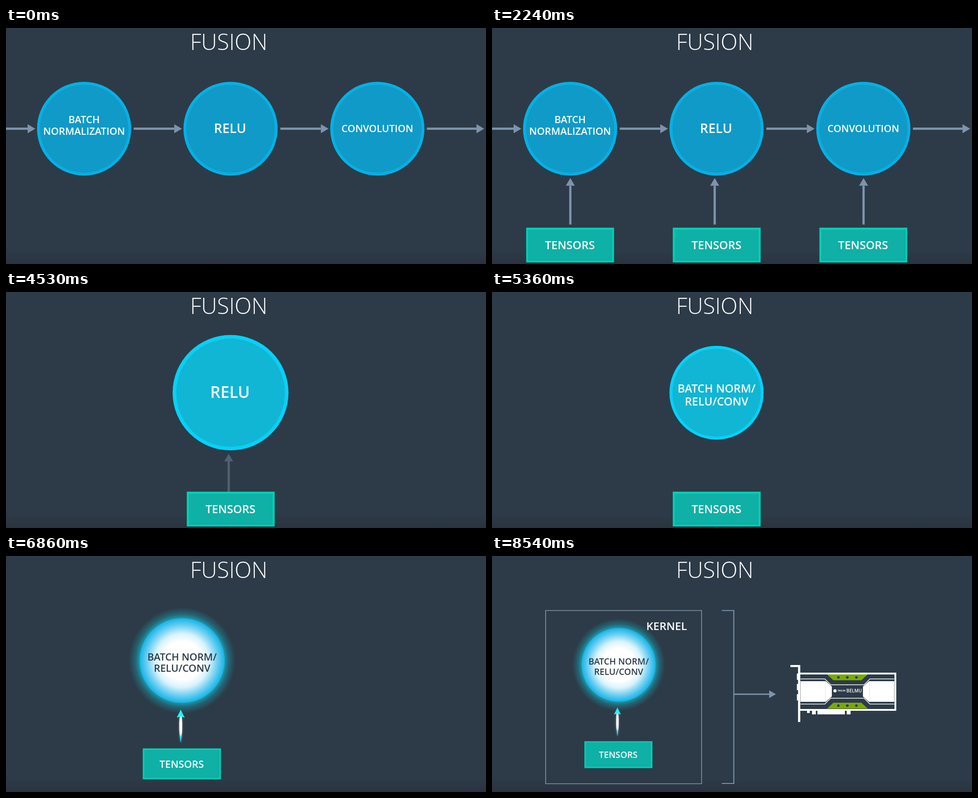
Recreate the animation shown at these times as an HTML page with a canvas. Size 1065 px wide and 526 px high, loop 8.97 s.

```html
<!DOCTYPE html>
<html lang="en">
<head>
<meta charset="utf-8">
<title>Fusion</title>
<style>
html, body { margin: 0; width: 100%; height: 100%; overflow: hidden; background: #2d3b48; }
canvas { display: block; }
</style>
</head>
<body>
<canvas id="stage" width="1065" height="526"></canvas>
<script>
const ctx = document.getElementById('stage').getContext('2d');
const LOOP = 8970, BEAT = 209.6, LEAD = 82;
const DARK = '#2d3b48', STEEL = '#7d94ac', WHITE = '#fff';
const MID = 224.4, RADIUS = 104.5, ARROW_TRAVEL = 45, BOX_TRAVEL = 55;
const columnX = i => 173.3 + 325.3 * i;
const COLUMNS = [
  { lines: ['BATCH', 'NORMALIZATION'], size: 22, boxExit: 3070, arrowExit: 3220 },
  { lines: ['RELU'], size: 29, boxExit: Infinity, arrowExit: 4150 },
  { lines: ['CONVOLUTION'], size: 21.8, boxExit: 3245, arrowExit: 3490 }
];
let now = 0;

const ramp = (start, length) => Math.min(1, Math.max(0, (now - start) / length));
const smooth = p => p * p * (3 - 2 * p);
const easeOut = p => 1 - (1 - p) ** 2;
const lerp = (a, b, p) => a + (b - a) * p;
// The picture moves in even held beats.
const hold = time => Math.floor((time + LEAD) / BEAT) * BEAT - LEAD;

function layer(alpha, x, y, scale, draw) {
  if (alpha <= 0 || scale === 0) return;
  ctx.save();
  ctx.globalAlpha *= alpha;
  ctx.translate(x, y);
  ctx.scale(scale, scale);
  draw();
  ctx.restore();
}

// Rises into view at `enter`, drops out of view at `exit`.
function drift(enter, exit, travel, draw) {
  const shown = easeOut(ramp(enter, 500)), gone = ramp(exit, 500) ** 2;
  layer(shown * (1 - gone), 0, travel * (1 - shown + gone), 1, draw);
}

function text(str, x, y, size, color = WHITE, weight = 600) {
  ctx.font = `${weight} ${size}px "Open Sans", sans-serif`;
  ctx.textAlign = 'center';
  ctx.fillStyle = color;
  ctx.fillText(str, x, y);
}

function box(x, y, w, h, color) {
  ctx.fillStyle = color;
  ctx.fillRect(x, y, w, h);
}

function disc(x, y, r, fill) {
  ctx.fillStyle = fill;
  ctx.beginPath();
  ctx.arc(x, y, r, 0, 7);
  ctx.fill();
}

function path(points) {
  ctx.beginPath();
  points.forEach(p => ctx.lineTo(...p));
}

function poly(points, color) {
  path(points);
  ctx.fillStyle = color;
  ctx.fill();
}

function trace(points, amount, color, width) {
  if (!amount) return;
  const total = points.slice(1).reduce((sum, p, i) =>
    sum + Math.hypot(p[0] - points[i][0], p[1] - points[i][1]), 0);
  ctx.save();
  ctx.setLineDash([total * amount, total * 2]);
  ctx.strokeStyle = color;
  ctx.lineWidth = width;
  path(points);
  ctx.stroke();
  ctx.restore();
}

function spread(gradient, colors) {
  colors.forEach((c, i) => gradient.addColorStop(i / (colors.length - 1), c));
  return gradient;
}

const radial = (inner, outer, ...colors) =>
  spread(ctx.createRadialGradient(0, 0, inner, 0, 0, outer), colors);
const vertical = (top, bottom, ...colors) =>
  spread(ctx.createLinearGradient(0, top, 0, bottom), colors);

function arrow(x, y, length, angle = 0, thick = 5, head = 17, half = 10) {
  ctx.save();
  ctx.translate(x, y);
  ctx.rotate(angle);
  box(0, -thick / 2, length - head, thick, STEEL);
  poly([[length - head, -half], [length, 0], [length - head, half]], STEEL);
  ctx.restore();
}

function tensors(x, y) {
  box(x - 92.5, y + 5, 185, 67.5, '#0fb0a5');
  ctx.strokeStyle = '#00ceb5';
  ctx.lineWidth = 5;
  ctx.strokeRect(x - 95, y + 2.5, 190, 72.5);
  text('TENSORS', x - 0.5, y + 48, 25);
}

function node(x, scale, light, label) {
  layer(1, x, MID, scale, () => {
    disc(0, 0, RADIUS, `rgb(6,${lerp(176, 209, light)},${lerp(228, 247, light)})`);
    disc(0, 0, RADIUS - 6.5, `rgb(16,${lerp(154, 182, light)},${lerp(199, 212, light)})`);
    label();
  });
}

function columnLabel({ lines, size }) {
  const first = lines.length > 1 ? -12.5 : size * 0.33;
  lines.forEach((line, i) => text(line, 0, first + 26 * i, size));
}

function fusedLabel(color) {
  text('BATCH NORM/', 0, -0.5, 24.9, color);
  text('RELU/CONV', 0, 28.5, 24.9, color);
}

function pipeline() {
  for (let i = 0; i < 4; i++) {
    const last = i === 3;
    drift(-1000, last ? 3070 : 3180, ARROW_TRAVEL, () =>
      arrow(columnX(i - 1) + 110, MID, last ? 127 : 107));
  }
  COLUMNS.forEach(({ boxExit, arrowExit }, i) => {
    const x = columnX(i), arrowX = i === 1 ? x - 4.5 : x + 0.5;
    drift(1450 + 130 * i, arrowExit, ARROW_TRAVEL, () => arrow(arrowX, 438, 103.5, -Math.PI / 2));
    drift(1100 + 130 * i, boxExit, BOX_TRAVEL, () => tensors(x, 445));
  });

  const merge = smooth(ramp(3800, 630));
  const swell = smooth(ramp(4260, 270)), settle = smooth(ramp(4650, 350));
  const center = columnX(1) - 0.4;
  if (merge < 1) [0, 2].forEach(i =>
    node(lerp(columnX(i), center, merge), 1, 0, () => columnLabel(COLUMNS[i])));
  node(center, 1 + 0.23 * swell * (1 - settle), swell, () => {
    layer(1 - ramp(4560, 250), -1, 0, 1, () => columnLabel(COLUMNS[1]));
    layer(1, 0, 0, smooth(ramp(4460, 540)), () => fusedLabel(WHITE));
  });
}

function glowArrow() {
  ctx.save();
  ctx.shadowColor = 'rgba(255,255,255,.4)';
  ctx.shadowBlur = 4;
  ctx.fillStyle = vertical(406, 415, WHITE, '#1ae8f5');
  ctx.beginPath();
  ctx.moveTo(489, 363);
  ctx.quadraticCurveTo(485.5, 398, 491.5, 430);
  ctx.quadraticCurveTo(497.5, 398, 494, 363);
  ctx.fill();
  ctx.restore();
  poly([[491.5, 347], [501.5, 367], [491.5, 364], [481.5, 367]], '#1ff4fb');
}

function fused(glow) {
  const p = smooth(ramp(6540, 600));
  layer(glow, lerp(495, 281, p), lerp(224, 242.5, p), lerp(1, 0.774, p), () => {
    disc(0, 0, 133, radial(100, 133,
      'rgba(18,200,222,.9)', 'rgba(18,180,200,.35)', 'rgba(18,170,190,0)'));
    disc(0, 0, 106, radial(48, 106, WHITE, '#d9f3fc', '#74d1f3', '#16b4e6'));
    fusedLabel(DARK);
    ctx.translate(-495, -224);
    tensors(494.3, 444);
    const rise = easeOut(ramp(5900, 450));
    layer(rise, 0, 30 * (1 - rise), 1, glowArrow);
  });
}

function burst() {
  layer(0.6 * Math.sin(Math.PI * ramp(5450, 950)), 496, 224, 1, () =>
    disc(0, 0, 250, radial(90, 250,
      'rgba(120,240,255,.9)', 'rgba(30,200,225,.25)', 'rgba(30,180,210,0)')));
}

// One quarter of the card's face, measured from the card's center.
function cardQuarter() {
  poly([[-45, -38], [0.5, -38], [0.5, -25], [-31, -25]], '#78aa00');
  disc(-20, -31.5, 2.8, DARK);
  disc(0, -31.5, 2.8, DARK);
  trace([[-104, -28], [-50, -28], [-37, -15], [0.5, -15]], 1, WHITE, 1.6);
  poly([[-104, -23], [-48, -23], [-34.5, -11], [-34.5, 0.5], [-104, 0.5]], WHITE);
  box(-49.5, -23, 1, 23, '#dfe3e6');
}

function card() {
  box(679, 243, 5, 127, WHITE);
  box(662, 243, 22, 4.5, WHITE);
  for (let y = 262; y < 320; y += 23) box(676.5, y, 3, 14, WHITE);
  box(722, 345, 61, 8, WHITE);
  box(699, 345, 6, 5, WHITE);
  [710, 787].forEach(x => box(x, 345, 8.5, 8, WHITE));
  ctx.strokeStyle = WHITE;
  ctx.lineWidth = 4;
  ctx.strokeRect(682, 262, 213, 81);
  for (const sx of [1, -1]) for (const sy of [1, -1]) {
    ctx.save();
    ctx.translate(788.5, 302);
    ctx.scale(sx, sy);
    cardQuarter();
    ctx.restore();
  }
  disc(761, 300.5, 3.6, WHITE);
  text('TAVLOK', 775.5, 302.3, 4.6, WHITE, 700);
  text('BELMU', 803.5, 304.3, 10, WHITE);
}

function kernel() {
  trace([[465.5, 121.5], [119, 121.5], [119, 507.5], [465, 507.5], [465, 121.5]],
    ramp(7044, 498), '#8798a6', 1.6);
  layer(ramp(7600, 250), 0, 0, 1, () => text('KERNEL', 387.5, 165, 24.3));
  trace([[510, 121.5], [536.5, 121.5], [536.5, 507], [510, 507]], ramp(7800, 340), STEEL, 2.2);
  const reach = ramp(8050, 300);
  if (reach) arrow(537, 308, lerp(15, 93, reach), 0, 3, 15, 8.5);
  layer(ramp(8200, 300), 0, 0, 1, card);
}

function render() {
  now = hold(performance.now() % LOOP);
  box(0, 0, 1065, 526, DARK);
  box(0, 495, 1065, 31, vertical(495, 526, 'rgba(35,38,44,0)', 'rgba(35,38,44,.35)'));
  const glow = smooth(ramp(5450, 650));
  if (glow < 1) pipeline();
  burst();
  fused(glow);
  kernel();
  text('FUSION', 494.3, 48.7, 49, WHITE, 300);
  requestAnimationFrame(render);
}
render();
</script>
</body>
</html>
```
